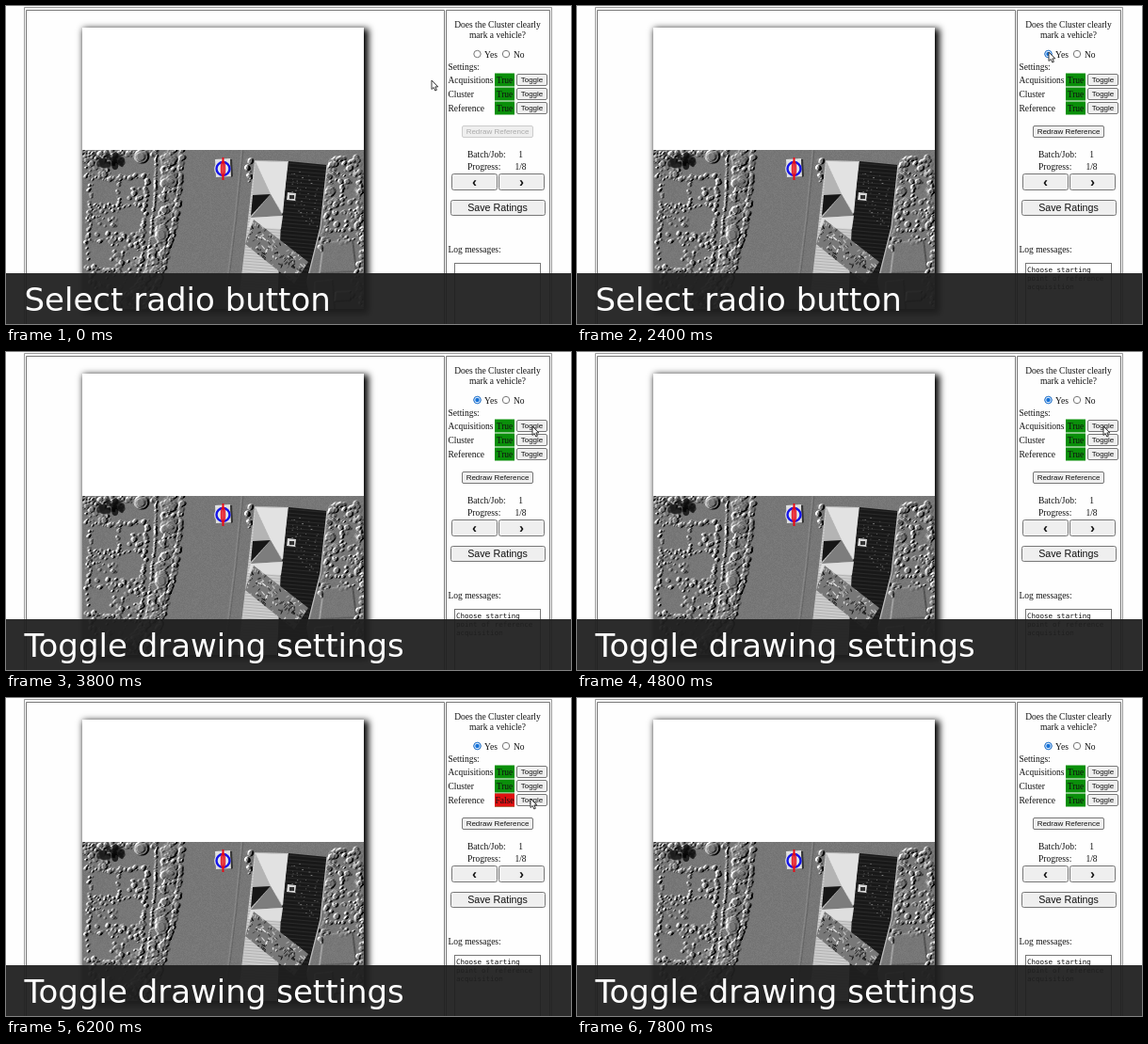
These frames come from a looping animation (600x338 px, 8000 ms). An HTML page with a canvas:

```html
<!DOCTYPE html>
<html lang="en">
<head>
<meta charset="utf-8">
<title>Cluster rating</title>
<style>
html, body { margin: 0; width: 100%; height: 100%; overflow: hidden; background: #fff; }
#stage { position: relative; width: 600px; height: 338px; overflow: hidden; background: #fefefe; }
#stage > * { position: absolute; }
#sheet { left: 81px; top: 23px; width: 299px; height: 299px; background: #fff; box-shadow: 3px 3px 7px 2px #000; }
#terrain { left: 81px; top: 153px; }
svg { left: 0; top: 0; }
text { font: 9.5px "Liberation Serif", serif; fill: #111; }
.mid { text-anchor: middle; }
.button rect { fill: #efefef; stroke: #777; }
.button text { font: 8px "Liberation Sans", sans-serif; text-anchor: middle; }
.button .big { font-size: 10.7px; }
.button .arrow { font-size: 15px; font-weight: bold; }
.disabled rect { stroke: #ccc; }
.disabled text { fill: #aaa; }
.log text { font: 7.5px "DejaVu Sans Mono", monospace; }
.caption rect { fill: rgba(31, 31, 31, .94); }
.caption text { font: 34px "DejaVu Sans", sans-serif; fill: #fff; }

/* Everything advances on a 200 ms (2.5%) beat. */
.on, .off, .picked, .first, .second, .cursor { animation: 8s step-end infinite; }
.on { --base: 1; --flip: 0; }
.off { --base: 0; --flip: 1; }
.acquisitions { animation-name: acquisitions; }
.cluster { animation-name: cluster; }
.reference { animation-name: reference; }
.picked { animation-name: picked; }
.first { animation-name: first; }
.second { animation-name: second; }
.cursor { animation-name: move; }
.ghost { animation: ghost 8s step-end infinite; }
@keyframes acquisitions {
  0%, 57.5%, 100% { opacity: var(--base); }
  50% { opacity: var(--flip); }
}
@keyframes cluster {
  0%, 72.5%, 100% { opacity: var(--base); }
  62.5% { opacity: var(--flip); }
  70% { opacity: .5; }
}
@keyframes reference {
  0%, 82.5%, 100% { opacity: var(--base); }
  77.5% { opacity: var(--flip); }
}
@keyframes picked { 0% { opacity: 0; } 27.5%, 100% { opacity: 1; } }
@keyframes first { 0% { opacity: 1; } 32.5%, 100% { opacity: 0; } }
@keyframes second { 0% { opacity: 0; } 40%, 100% { opacity: 1; } }
@keyframes move {
  0%, 15% { transform: translate(452px, 79px); opacity: 1; }
  17.5% { transform: translate(462px, 35px); opacity: .5; }
  20% { transform: translate(481px, 42px); opacity: 1; animation-timing-function: steps(2); }
  25% { transform: translate(501px, 49px); }
  35% { transform: translate(501px, 49px); animation-timing-function: steps(3); }
  42.5%, 60% { transform: translate(559px, 79px); }
  62.5%, 72.5% { transform: translate(556px, 92px); }
  75% { transform: translate(557px, 107px); }
  82.5% { transform: translate(557px, 107px); opacity: 1; animation-timing-function: steps(2); }
  87.5% { transform: translate(452px, 87px); opacity: .5; }
  90%, 100% { transform: translate(447px, 87px); opacity: 0; }
}
@keyframes ghost {
  0% { opacity: 0; }
  87.5% { opacity: .5; }
  90%, 100% { opacity: 0; }
}
</style>
</head>
<body>
<div id="stage">
  <div id="sheet"></div>
  <canvas id="terrain" width="299" height="169"></canvas>
  <svg width="600" height="338" viewBox="0 0 600 338">
    <g fill="none" stroke="#777">
      <path d="M19.5 345V1.5H579.5V345" stroke="#999"/>
      <path d="M21.5 345V4.5H465.5V345M467.5 345V4.5H577.5V345"/>
    </g>

    <g class="on cluster" fill="none" stroke="#1616e8" stroke-width="2.4">
      <circle cx="230.5" cy="173" r="7"/>
    </g>
    <g class="on acquisitions" fill="none" stroke="#e80c18">
      <path d="M230.5 161V185" stroke-width="2"/>
      <ellipse cx="230.5" cy="173" rx="2" ry="8" stroke-width="1.3"/>
    </g>

    <g class="mid">
      <text x="522" y="23">Does the Cluster clearly</text>
      <text x="522" y="34">mark a vehicle?</text>
    </g>
    <g fill="#fff" stroke="#777">
      <circle cx="500.5" cy="51" r="3.7"/>
      <circle cx="531" cy="51" r="3.7"/>
    </g>
    <g class="picked">
      <circle cx="500.5" cy="51" r="3.7" fill="#fff" stroke="#1672d8"/>
      <circle cx="500.5" cy="51" r="2.3" fill="#1672d8"/>
    </g>
    <text x="508" y="54.5">Yes</text>
    <text x="539" y="54.5">No</text>
    <text x="469.5" y="67.5">Settings:</text>
    <g id="settings"></g>

    <g class="button disabled">
      <rect x="484.5" y="127.5" width="75" height="12" rx="1.5"/>
      <text x="522" y="136.4">Redraw Reference</text>
    </g>
    <g class="button picked">
      <rect x="484.5" y="127.5" width="75" height="12" rx="1.5"/>
      <text x="522" y="136.4">Redraw Reference</text>
    </g>

    <text x="490" y="160.5">Batch/Job:</text>
    <text x="546.5" y="160.5" class="mid">1</text>
    <text x="490" y="174">Progress:</text>
    <text x="546.5" y="174" class="mid">1/8</text>
    <g class="button">
      <rect x="473.5" y="178.5" width="48" height="17" rx="2"/>
      <text x="497.5" y="191.5" class="arrow">‹</text>
      <rect x="523.5" y="178.5" width="48" height="17" rx="2"/>
      <text x="547.5" y="191.5" class="arrow">›</text>
      <rect x="472.5" y="206.5" width="100" height="16" rx="2"/>
      <text x="522" y="217.5" class="big">Save Ratings</text>
    </g>
    <text x="469.5" y="262">Log messages:</text>
    <rect x="476.5" y="273.5" width="91" height="80" fill="#fff" stroke="#777"/>
    <g class="log picked">
      <text x="478" y="283">Choose starting</text>
      <text x="478" y="292">point of reference</text>
      <text x="478" y="301">acquisition</text>
    </g>

    <g class="caption first">
      <rect y="284" width="600" height="54"/>
      <text x="19.5" y="324">Select radio button</text>
    </g>
    <g class="caption second">
      <rect y="284" width="600" height="54"/>
      <text x="19.5" y="324">Toggle drawing settings</text>
    </g>

    <g fill="#fff" stroke="#222" stroke-width=".9" stroke-linejoin="round">
      <path class="ghost" transform="translate(447 87)" d="M0 0V9.5L2.2 7.5 3.8 11 5.4 10.3 3.9 6.9H6.8Z"/>
      <path class="cursor" d="M0 0V9.5L2.2 7.5 3.8 11 5.4 10.3 3.9 6.9H6.8Z"/>
    </g>
  </svg>
</div>
<script>
const cell = (cls, y, color, label) => `<g class="${cls}">
  <rect x="519" y="${y - 7}" width="21" height="14" fill="${color}"/>
  <text class="mid" x="529.5" y="${y + 3.2}">${label}</text></g>`;
document.getElementById('settings').innerHTML = ['Acquisitions', 'Cluster', 'Reference'].map((name, i) => {
  const y = 78.5 + 15 * i;
  return `<text x="469.5" y="${y + 3.2}">${name}</text>
    ${cell('', y, '#0a8f0a', 'True')}
    ${cell('off ' + name.toLowerCase(), y, '#e01010', 'False')}
    <g class="button"><rect x="542.5" y="${y - 6}" width="32" height="12" rx="1.5"/>
    <text x="558.5" y="${y + 2.8}">Toggle</text></g>`;
}).join('');

const canvas = document.getElementById('terrain');
const g = canvas.getContext('2d', { willReadFrequently: true });
const { width: W, height: H } = canvas;

let seed = 7;
function rand(a = 0, b = 1) {
  seed = (seed + 0x6d2b79f5) | 0;
  let n = Math.imul(seed ^ (seed >>> 15), 1 | seed);
  n = (n + Math.imul(n ^ (n >>> 7), 61 | n)) ^ n;
  return a + (b - a) * ((n ^ (n >>> 14)) >>> 0) / 4294967296;
}
const gray = (v, a = 1) => `rgba(${v},${v},${v},${a})`;

function trace(points) {
  g.beginPath();
  for (let i = 0; i < points.length; i += 2) g.lineTo(points[i], points[i + 1]);
}
function area(points, shade) {
  trace(points);
  g.fillStyle = gray(shade);
  g.fill();
}
function dab(x, y, r, height) {
  g.beginPath();
  g.ellipse(x, y, r, r * rand(.6, 1.3), rand(0, 3), 0, 7);
  g.fillStyle = gray(height, .75);
  g.fill();
}
function scatter(x, y, w, h, count, size) {
  for (let i = 0; i < count; i++) dab(rand(x, x + w), rand(y, y + h), rand(.5, size), rand(30, 210));
}
function hedge(points, spread, size, step = 1.8) {
  for (let i = 2; i < points.length; i += 2) {
    const [x, y, u, v] = points.slice(i - 2, i + 2);
    const n = Math.hypot(u - x, v - y) / step;
    for (let k = 0; k < n; k++)
      dab(x + (u - x) * k / n + rand(-spread, spread), y + (v - y) * k / n + rand(-spread, spread),
        rand(.6, size), rand(40, 220));
  }
}

// Height map, in stage coordinates
function raise() {
  g.fillStyle = gray(40);
  g.fillRect(81, 153, W, H);
  hedge([83, 157, 158, 156], 2.5, 3);
  hedge([87, 184, 150, 181, 143, 285, 84, 278], 2, 2.4);
  hedge([90, 190, 86, 270], 2, 2);
  hedge([88, 213, 147, 211], 2, 2);
  hedge([86, 250, 140, 247], 2, 2);
  hedge([120, 183, 117, 250], 2, 1.8, 3);
  scatter(83, 155, 28, 27, 55, 3);
  scatter(86, 215, 30, 35, 40, 2.5);
  scatter(112, 240, 32, 42, 55, 3);
  scatter(130, 190, 17, 20, 16, 3);
  scatter(82, 283, 48, 37, 55, 3);
  hedge([160, 153, 158, 205, 150, 280, 137, 298], .7, 1.4, 1);
  hedge([172, 153, 174, 190, 168, 230, 159, 275, 145, 300, 118, 319], 7, 4.2, .7);
  hedge([186, 153, 185, 195, 176, 245, 164, 290, 145, 322], 1.8, 2.8, 1);
  for (const [x, y, r] of [[144, 160, 7], [166, 243, 7], [176, 186, 6], [169, 217, 5], [230.5, 172, 9]]) {
    dab(x, y, r, 190);
    dab(x - 1, y, r * .6, 230);
  }
  trace([251, 153, 244, 225, 236, 290, 232, 322]);
  g.lineWidth = 1.2;
  g.strokeStyle = gray(55);
  g.stroke();
  hedge([257, 163, 260, 185], 2.5, 2.5);
  hedge([342, 165, 378, 163], 3, 3);
  hedge([345, 170, 341, 225, 336, 260], 3, 3);
  scatter(343, 164, 36, 34, 75, 3.2);
  scatter(345, 200, 34, 34, 55, 3);
  hedge([336, 239, 379, 236], 1.5, 2);
  hedge([374, 165, 377, 280], 3, 3);
  area([337, 252, 368, 248, 372, 282, 333, 284], 75);
  area([328, 293, 347, 291, 349, 322, 327, 322], 95);
  area([350, 304, 366, 303, 366, 313, 349, 314], 150);
  scatter(330, 243, 48, 10, 18, 2.5);
  scatter(366, 280, 14, 40, 28, 3);
}

// Relief shading with light from the upper left
function shade() {
  const image = g.getImageData(0, 0, W, H), px = image.data;
  const height = Uint8Array.from({ length: W * H }, (_, i) => px[i * 4]);
  const at = (x, y) => height[Math.min(H - 1, Math.max(0, y)) * W + Math.min(W - 1, Math.max(0, x))];
  for (let i = 0; i < W * H; i++) {
    const x = i % W, y = Math.floor(i / W);
    const slope = at(x + 1, y) - at(x - 1, y) + .5 * (at(x, y + 1) - at(x, y - 1));
    px[i * 4] = px[i * 4 + 1] = px[i * 4 + 2] = 119 + slope * 1.1 + rand(-5, 5);
  }
  g.putImageData(image, 0, 0);
}

function stripes(points, color, gap, dx, dy) {
  g.save();
  trace(points);
  g.clip();
  g.lineWidth = .7;
  g.strokeStyle = color;
  for (let y = 150; y < 345; y += gap) {
    trace([240, y, 240 + dx, y + dy]);
    g.stroke();
  }
  g.restore();
}

function roof() {
  const light = [264, 164, 300, 165, 292, 240, 288, 322, 246, 322, 253, 262];
  const dark = [300, 165, 341, 169, 334, 235, 319, 293, 325, 322, 288, 322, 292, 230];
  area(light, 205);
  stripes(light, gray(150, .7), 3, 60, 5);
  area(dark, 24);
  stripes(dark, gray(70, .6), 4, 105, 9);
  area([265, 165, 299, 166, 294, 221, 281, 200], 226);
  area([265, 166, 281, 200, 262, 201], 180);
  area([262, 201, 281, 200, 260, 223], 22);
  area([281, 200, 294, 223, 260, 225], 125);
  area([260, 225, 294, 223, 292, 237, 257, 235], 222);
  for (let i = 0; i < 55; i++) {
    g.fillStyle = gray(rand(60, 130));
    g.fillRect(rand(302, 332), rand(172, 235), rand(.6, 2), 1);
  }
  area([299, 198, 308, 199, 307, 207, 298, 206], 215);
  area([301, 201, 306, 201, 306, 205, 301, 205], 50);
  trace([341, 169, 334, 235, 320, 291]);
  g.lineWidth = 1.2;
  g.strokeStyle = gray(190);
  g.stroke();

  const panel = [263, 227, 321, 272, 306, 295, 254, 253];
  area(panel, 120);
  g.save();
  trace(panel);
  g.clip();
  for (let i = 0; i < 330; i++) {
    const x = rand(250, 322), y = rand(224, 297);
    trace([x, y, x + rand(-4, 4), y + rand(1, 4)]);
    g.lineWidth = rand(.7, 1.5);
    g.strokeStyle = gray(i % 2 ? rand(170, 235) : rand(15, 70));
    g.stroke();
  }
  g.restore();
}

g.translate(-81, -153);
raise();
shade();
// Dark tree crowns
for (let i = 0; i < 45; i++) dab(rand(99, 123), rand(157, 170), rand(1, 3.5), rand(0, 45));
for (let i = 0; i < 20; i++) dab(rand(128, 146), rand(306, 320), rand(1, 3), rand(0, 70));
// The vehicle
area([222, 163, 238, 162, 240, 181, 223, 182], 225);
area([238, 163, 240, 163, 241, 181, 239, 182], 50);
roof();
</script>
</body>
</html>
```
